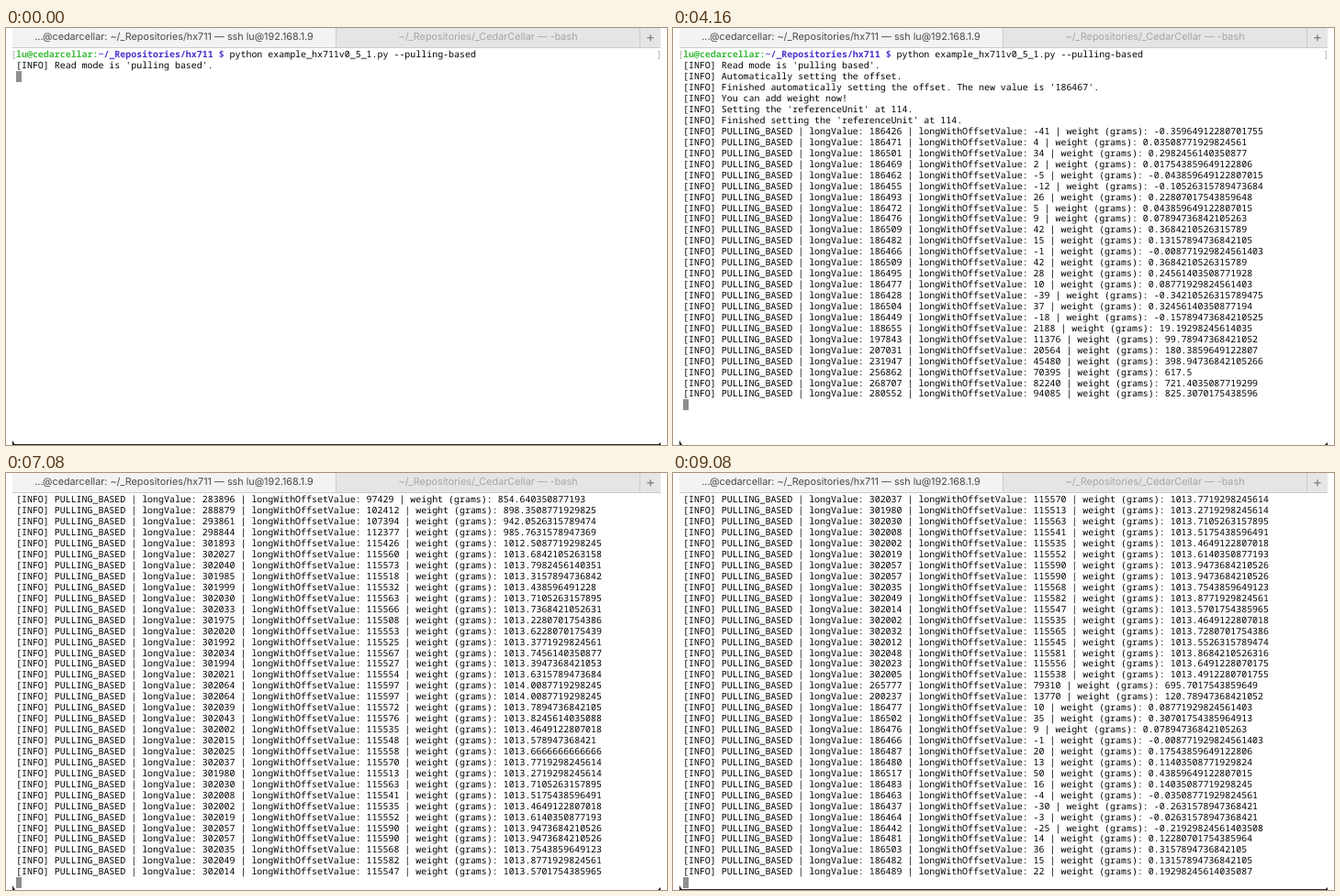
These frames come from a looping animation (720 by 455 pixels, 9560 ms). An HTML page:

```html
<!DOCTYPE html>
<html lang="en">
<head>
<meta charset="utf-8">
<title>Load cell readings</title>
<style>
  html, body { margin: 0; width: 100%; height: 100%; overflow: hidden; background: #fff; }
  #stage { position: relative; width: 720px; height: 455px; overflow: hidden; }
  #stage > * { position: absolute; box-sizing: border-box; }
  .tab {
    top: 0; height: 22px; border-bottom: 1px solid #cbcbcb; background: #e5e5e5; color: #a6a6a6;
    font: 10.8px/20px Inter, Roboto, sans-serif; text-align: center; white-space: pre;
    text-rendering: geometricPrecision;
  }
  .tab.active { background: #f3f3f3; color: #484848; }
  .tab + .tab { border-left: 1px solid #cdcdcd; }
  #screen {
    left: 11px; top: 23.4px; margin: 0; color: #000;
    font: 9.95px/11.94px "Noto Sans Mono", "DejaVu Sans Mono", monospace;
    text-rendering: geometricPrecision; font-variant-ligatures: none;
  }
  #screen b { color: #3dbb3d; }
  #screen b + b { color: #4633cc; }
  #cursor { left: 11px; width: 6px; height: 12px; background: #8f8f8f; }
  .mark { top: 25px; width: 2px; height: 9px; border: 1px solid #bdbdbd; }
  #edge { left: 8px; top: 454px; width: 704px; height: 1px; background: #2a2a2a; }
  .corner { top: 450px; width: 3px; height: 5px; background: #111; }
</style>
</head>
<body>
<div id="stage">
  <div class="tab active" style="left:7px;width:352px">...@cedarcellar: ~/_Repositories/hx711 — ssh lu@192.168.1.9</div>
  <div class="tab" style="left:359px;width:331px">~/_Repositories/_CedarCellar — -bash</div>
  <div class="tab" style="left:690px;width:23px;color:#777;font-size:15px">+</div>
  <div class="mark" style="left:8px;border-right:0"></div>
  <div class="mark" style="left:710px;border-left:0"></div>
  <pre id="screen"></pre>
  <div id="cursor"></div>
  <div id="edge"></div>
  <div class="corner" style="left:7px;clip-path:polygon(0 0,100% 100%,0 100%)"></div>
  <div class="corner" style="left:710px;clip-path:polygon(100% 40%,100% 100%,0 100%)"></div>
</div>
<script>
const LOOP = 9560, TICK = 40;
const OFFSET_START = 480, READ_START = 2240;
const FIRST_READING = 2184, READING_PERIOD = 81.4, READINGS = 85;
const ROWS = 35, ROW_HEIGHT = 11.94, TOP = 23.4;
const OFFSET = 186467, UNIT = 114, JITTER = 56;

// [reading, net value]: idle, weight put on, resting, taken off, idle
const loadCurve = [
  [-1, 0], [17, 0], [18, 2188], [20, 20564], [22, 70395], [24, 94085], [26, 97429],
  [29, 112377], [30, 115426], [31, 115560], [66, 115560], [67, 79310], [68, 13770],
  [69, 10], [READINGS, 10]
];

let seed = 711;
function random() {
  seed = (seed * 16807) % 2147483647;
  return seed / 2147483647;
}

// The sensor jitters wherever the load is steady.
function netValue(index) {
  const k = loadCurve.findIndex(([at]) => at >= index);
  const [fromAt, from] = loadCurve[k - 1], [toAt, to] = loadCurve[k];
  const load = from + (to - from) * (index - fromAt) / (toAt - fromAt);
  const noise = from === to ? (random() + random() + random() - 1.5) * JITTER : 0;
  return Math.round(load + noise) || 0;
}

const pythonFloat = x => Number.isInteger(x) ? x.toFixed(1) : String(x);

function reading(_, index) {
  const net = netValue(index);
  return `[INFO] PULLING_BASED | longValue: ${OFFSET + net} | longWithOffsetValue: ${net}` +
    ` | weight (grams): ${pythonFloat(net / UNIT)}`;
}

const lines = [
  "<b>lu@cedarcellar:</b><b>~/_Repositories/hx711 $</b> python example_hx711v0_5_1.py --pulling-based",
  "[INFO] Read mode is 'pulling based'.",
  "[INFO] Automatically setting the offset.",
  `[INFO] Finished automatically setting the offset. The new value is '${OFFSET}'.`,
  "[INFO] You can add weight now!",
  `[INFO] Setting the 'referenceUnit' at ${UNIT}.`,
  `[INFO] Finished setting the 'referenceUnit' at ${UNIT}.`,
  ...Array.from({ length: READINGS }, reading)
];
const HEADER = lines.length - READINGS;

function lineCount(t) {
  if (t < OFFSET_START) return 2;
  if (t < READ_START) return 3;
  const tick = Math.floor(t / TICK) * TICK;
  const printed = Math.floor((tick - FIRST_READING) / READING_PERIOD) + 1;
  return HEADER + Math.min(READINGS, printed);
}

const screenText = document.getElementById("screen");
const cursor = document.getElementById("cursor");
const edge = document.getElementById("edge");
const marks = document.querySelectorAll(".mark");
let shown = 0;

function render(now) {
  const t = now % LOOP;
  const count = lineCount(t);
  if (count !== shown) {
    const first = Math.max(0, count - ROWS);
    screenText.innerHTML = lines.slice(first, count).join("\n");
    cursor.style.top = TOP + (count - first) * ROW_HEIGHT + "px";
    marks.forEach(mark => { mark.hidden = first > 0; });
    shown = count;
  }
  edge.hidden = t >= OFFSET_START && t < LOOP - 480;
  requestAnimationFrame(render);
}
render(performance.now());
</script>
</body>
</html>
```
